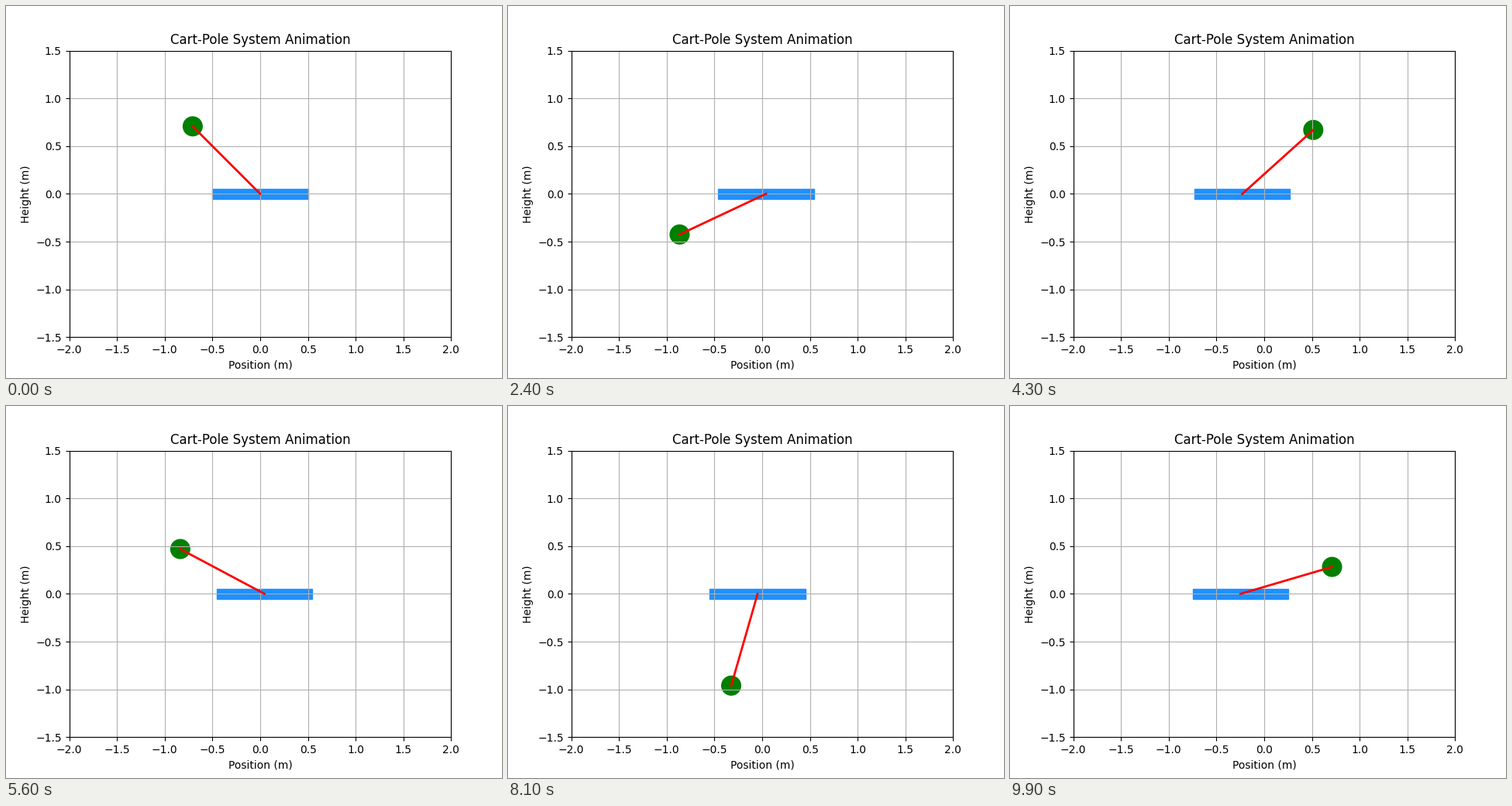
A matplotlib script for the animation above (10000 ms loop, 640 by 480 pixels).

```python
import numpy as np
import matplotlib.pyplot as plt
from matplotlib.animation import FuncAnimation
from matplotlib.patches import Circle, Rectangle

FRAMES, DURATION = 100, 10.0
GRAVITY = 9.81
MASS_RATIO = 1 / 6      # pole mass / total mass
DAMPING = 0.00125
DRIFT = 0.0029          # slow drift of the centre of mass, m/s
CART_W, CART_H, BOB_R = 1.0, 0.1, 0.1
START = np.pi / 4


def rates(state):
    """Pole angle from the upright (leftwards positive) and its speed."""
    angle, speed = state
    s, c = np.sin(angle), np.cos(angle)
    torque = GRAVITY * s - MASS_RATIO * s * c * speed**2 - DAMPING * speed
    return np.array([speed, torque / (1 - MASS_RATIO * c**2)])


def rk4_step(state, h):
    k1 = rates(state)
    k2 = rates(state + h / 2 * k1)
    k3 = rates(state + h / 2 * k2)
    k4 = rates(state + h * k3)
    return state + h / 6 * (k1 + 2 * k2 + 2 * k3 + k4)


def simulate(times, substeps=20):
    state = np.array([START, 0.0])
    angles = [START]
    h = (times[1] - times[0]) / substeps
    for _ in times[1:]:
        for _ in range(substeps):
            state = rk4_step(state, h)
        angles.append(state[0])
    return np.array(angles)


times = np.linspace(0, DURATION, FRAMES)
angles = simulate(times)
cart_x = MASS_RATIO * (np.sin(angles) - np.sin(START)) + DRIFT * times
bob_x = cart_x - np.sin(angles)
bob_y = np.cos(angles)

fig, ax = plt.subplots(figsize=(6.4, 4.8), dpi=100)
ax.set_xlim(-2, 2)
ax.set_ylim(-1.5, 1.5)
ax.set_aspect("equal")
ax.grid(True)
ax.set_title("Cart-Pole System Animation")
ax.set_xlabel("Position (m)")
ax.set_ylabel("Height (m)")

cart = ax.add_patch(Rectangle((-CART_W / 2, -CART_H / 2), CART_W, CART_H,
                              color="dodgerblue"))
bob = ax.add_patch(Circle((bob_x[0], bob_y[0]), BOB_R, color="green"))
pole, = ax.plot([], [], color="red", lw=2)


def update(i):
    cart.set_x(cart_x[i] - CART_W / 2)
    bob.center = bob_x[i], bob_y[i]
    pole.set_data([cart_x[i], bob_x[i]], [0, bob_y[i]])
    return cart, bob, pole


anim = FuncAnimation(fig, update, frames=FRAMES, interval=100,
                     repeat=True, repeat_delay=0)
plt.show()
```
